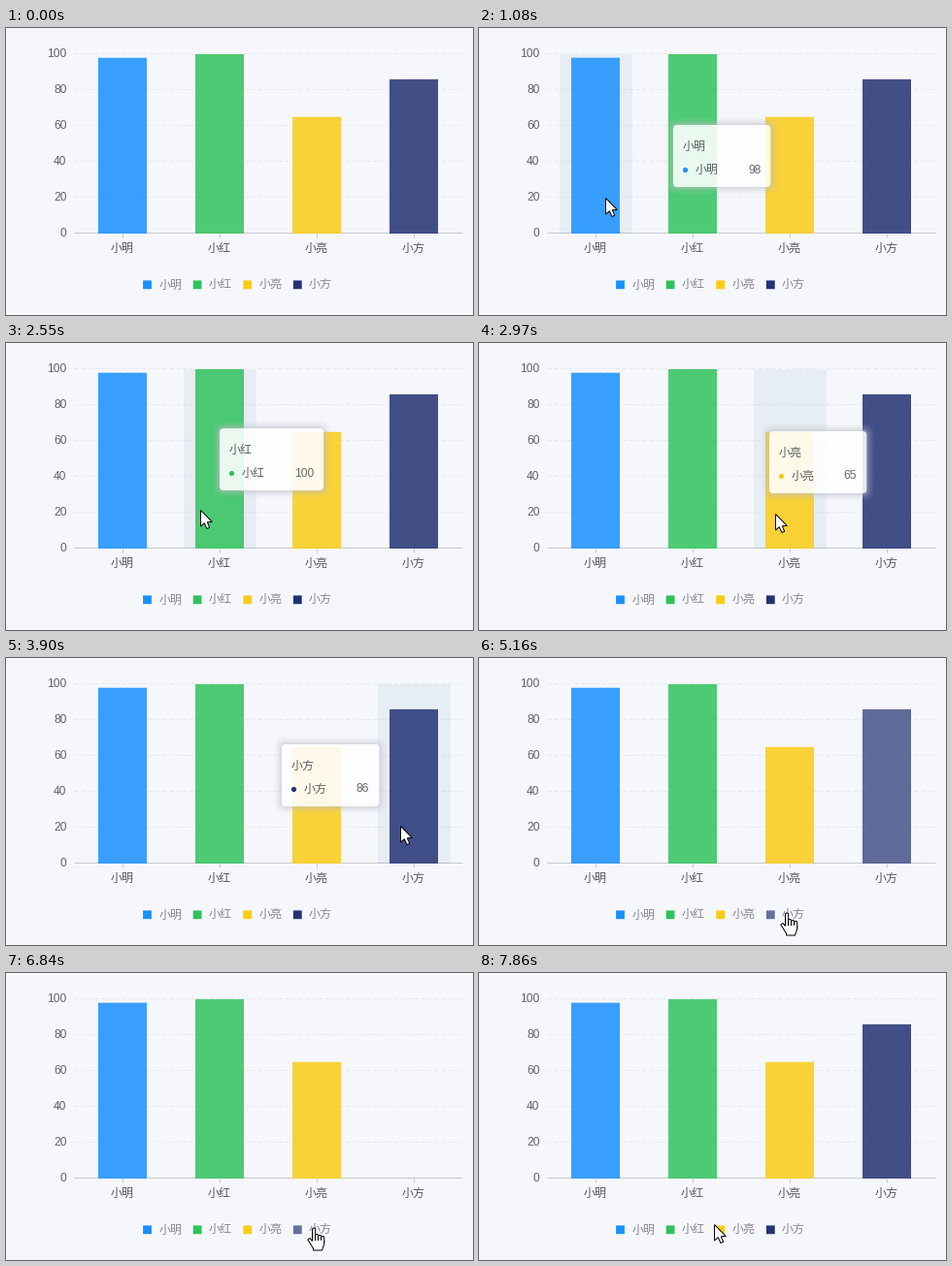
These frames come from a looping animation (481 px wide and 296 px high, 8000 ms). A matplotlib script:

```python
import math

import numpy as np
import matplotlib.pyplot as plt
from matplotlib.animation import FuncAnimation
from matplotlib.colors import to_rgb
from matplotlib.patches import Circle, FancyBboxPatch, Polygon, Rectangle
from matplotlib.transforms import Affine2D

W, H = 481, 296
LOOP, STEP, TICK = 8000, 32, 30  # ms; motion advances in ticks
DPI = 64
PX = 72 / DPI  # points per pixel

NAMES = ["小明", "小红", "小亮", "小方"]
VALUES = [98, 100, 65, 86]
COLORS = ["#1890ff", "#2fc25b", "#facc14", "#223273"]
LEFT, RIGHT, TOP, BASE = 70, 470, 27, 212
UNIT, BAND = (BASE - TOP) / 100, 100
LEGEND_X = [141.3 + 51.6 * i for i in range(4)]
TIP_H, GAP = 64, 20
AXIS, OFF, LEGEND_INK, TIP_INK = "#c6c8ce", "#cccccc", "#85878c", "#5c5e62"

# Pointer moves: start, end, x, y
ENTRY = (486, 241)
MOVES = [(630, 1140, 116, 172), (1770, 2070, 200, 172),
         (2730, 2970, 305, 176), (3390, 3900, 406, 173),
         (4410, 5070, 316, 262), (7140, 7860, 242, 259)]
CLICK_OFF, CLICK_ON, REGROW = 5880, 6840, 7020


def progress(t, start, end):
    return min(1, max(0, (t - start) / (end - start)))


def pointer(t):
    pos = np.array(ENTRY, float)
    for start, end, x, y in MOVES:
        u = progress(t, start, end)
        pos += (np.array([x, y]) - pos) * u * u * (3 - 2 * u)
    return pos


def legend_hit(x, y):
    if 256 < y < 272:
        for i, lx in enumerate(LEGEND_X):
            if lx - 2.4 <= x <= lx + 44:
                return i
    return None


def tip_width(i):
    return 87 + 6.67 * len(str(VALUES[i]))


def lift(color, k):
    rgb = np.array(to_rgb(color))
    return tuple(rgb + (1 - rgb) * k)


def simulate():
    """Pointer, tooltip and hover state for every tick of the loop."""
    states, tip, item, alpha = [], None, 0, 0.0
    follow = 1 - math.exp(-TICK / 85)
    for t in range(0, LOOP + TICK, TICK):
        x, y = pointer(t)
        inside = LEFT <= x < RIGHT and TOP <= y <= BASE
        if inside:
            item = int((x - LEFT) // BAND)
            w = tip_width(item)
            tx = x - w - GAP if x + w + GAP > W else x + GAP
            goal = np.array([tx, y - TIP_H - GAP])
            tip = goal if alpha <= 0 else tip + (goal - tip) * follow
            alpha = min(1, alpha + TICK / 100)
        else:
            alpha = max(0, alpha - TICK / 200)
        states.append(dict(t=t, x=x, y=y, inside=inside, tip=tip, item=item,
                           alpha=alpha, hover=legend_hit(x, y)))
    return states


STATES = simulate()

fig = plt.figure(figsize=(W / DPI, H / DPI), dpi=DPI, facecolor="#f6f7fc")
ax = fig.add_axes([0, 0, 1, 1])
ax.set_xlim(0, W)
ax.set_ylim(H, 0)
ax.axis("off")


def label(x, y, s, color, ha="left", **kw):
    font = "Liberation Sans" if s.isdigit() else "Noto Sans CJK JP"
    return ax.text(x, y, s, color=color, ha=ha, va="baseline",
                   family=font, fontsize=12 * PX, **kw)


def line(xs, ys, color, **kw):
    kw = dict(lw=PX, solid_capstyle="butt", dash_capstyle="butt",
              zorder=1) | kw
    return ax.plot(xs, ys, color=color, **kw)[0]


# Axes and grid
for v in range(0, 101, 20):
    gy = BASE - v * UNIT
    label(62.5, gy + 3, str(v), "#606266", "right")
    if v:
        line([LEFT, RIGHT], [gy - 1] * 2, "#e7e9ee", ls=(0, (4, 3)))
line([LEFT, RIGHT], [BASE - 1] * 2, AXIS)

band = Rectangle((0, TOP), 75, BASE - TOP, fc=(.416, .616, .753, .1), lw=0,
                 zorder=2)
ax.add_patch(band)

# Bars and legend
bars, icons, keys = [], [], []
for i, (name, value, color) in enumerate(zip(NAMES, VALUES, COLORS)):
    cx, lx = LEFT + BAND * (i + .5), LEGEND_X[i]
    line([cx] * 2, [BASE, BASE + 4], AXIS)
    label(cx, 231, name, "#55575b", "center")
    bar = Rectangle((cx - 25, BASE), 50, -value * UNIT, fc=color, lw=0,
                    alpha=.85, snap=False, zorder=3)
    icon = Rectangle((lx - .2, 260.4), 8.8, 8.8, fc=color, lw=0, snap=False,
                     zorder=3)
    ax.add_patch(bar)
    ax.add_patch(icon)
    bars.append(bar)
    icons.append(icon)
    keys.append(label(lx + 16, 268.4, name, LEGEND_INK))

# Tooltip
shift = Affine2D()
tip_tf = shift + ax.transData
tip_parts = []


def tip_part(artist, alpha=1):
    tip_parts.append((artist, alpha))
    return artist


def tip_box(grow, alpha, **kw):
    style = f"round,pad=0,rounding_size={4 + grow}"
    box = FancyBboxPatch((-grow, -grow), 100, TIP_H + 2 * grow,
                         boxstyle=style, transform=tip_tf, **kw)
    ax.add_patch(box)
    return grow, tip_part(box, alpha)


boxes = [tip_box(k, .6 * (1 - k / 10) ** 2, fill=False, ec="#bcbec5", lw=PX,
                 zorder=6) for k in np.arange(.5, 9)]
boxes.append(tip_box(0, .89, fc="white", lw=0, zorder=7))
dot = Circle((12.5, 46.5), 2.6, lw=0, transform=tip_tf, zorder=8)
ax.add_patch(tip_part(dot))
on_tip = dict(transform=tip_tf, zorder=8)
title = tip_part(label(10, 25.5, NAMES[0], TIP_INK, **on_tip))
entry = tip_part(label(22.7, 49.5, NAMES[0], TIP_INK, **on_tip))
amount = tip_part(label(90, 49.5, "0", "#66686c", "right", **on_tip))

# Pointers, with the hot spot at the origin
at = Affine2D()
ink = dict(fc="white", ec="black", lw=PX, zorder=10,
           transform=at + ax.transData)
arrow = Polygon([(0, 0), (0, 16.6), (3.8, 13.2), (6.4, 19), (9.2, 17.8),
                 (6.8, 12.2), (11.8, 12)], joinstyle="miter", **ink)
hand = [FancyBboxPatch((-1 + 3 * k, top), 3.2, 17 - top,
                       boxstyle="round,pad=0,rounding_size=1.5", **ink)
        for k, top in enumerate((.5, 7, 8, 9))]
hand.append(Polygon([(-1, 14), (-3.5, 11), (-5.7, 12.5), (0, 21.5), (0, 23.5),
                     (9, 23.5), (11.2, 17), (11.2, 13)], closed=False, **ink))
for part in [arrow, *hand]:
    ax.add_patch(part)


def draw_series(s):
    t = s["t"]
    for i, color in enumerate(COLORS):
        hot = s["hover"] == i
        bars[i].set_facecolor(lift(color, .16 * hot))
        icons[i].set_facecolor(lift(color, .3 * hot))
    off = CLICK_OFF <= t < CLICK_ON
    if off:
        icons[3].set_facecolor(OFF)
    keys[3].set_color(OFF if off else LEGEND_INK)

    fade = grow = 1
    if t >= REGROW:
        grow = 1 - (1 - progress(t, REGROW, REGROW + 500)) ** 3
    else:
        fade = 1 - progress(t, CLICK_OFF, CLICK_OFF + 300)
    bars[3].set_alpha(.85 * fade)
    bars[3].set_height(-VALUES[3] * UNIT * grow)


def draw_tooltip(s):
    band.set_visible(s["inside"])
    band.set_x(LEFT + BAND * s["item"] + 12.5)
    for artist, alpha in tip_parts:
        artist.set_visible(s["alpha"] > 0)
        artist.set_alpha(alpha * s["alpha"])
    if s["alpha"] <= 0:
        return
    i = s["item"]
    w = tip_width(i)
    shift.clear().translate(*np.round(s["tip"]))
    for grow, box in boxes:
        box.set_width(w + 2 * grow)
    dot.set_facecolor(COLORS[i])
    title.set_text(NAMES[i])
    entry.set_text(NAMES[i])
    amount.set_text(str(VALUES[i]))
    amount.set_x(w - 10)


def draw_pointer(s):
    at.clear().translate(round(s["x"]) + .5, round(s["y"]) + .5)
    on_item = s["hover"] is not None
    arrow.set_visible(not on_item)
    for part in hand:
        part.set_visible(on_item)


def draw(n):
    s = STATES[math.ceil(n * STEP / TICK)]
    draw_series(s)
    draw_tooltip(s)
    draw_pointer(s)
    return []


anim = FuncAnimation(fig, draw, frames=LOOP // STEP, interval=STEP,
                     repeat=True, repeat_delay=0, blit=False)
plt.show()
```
